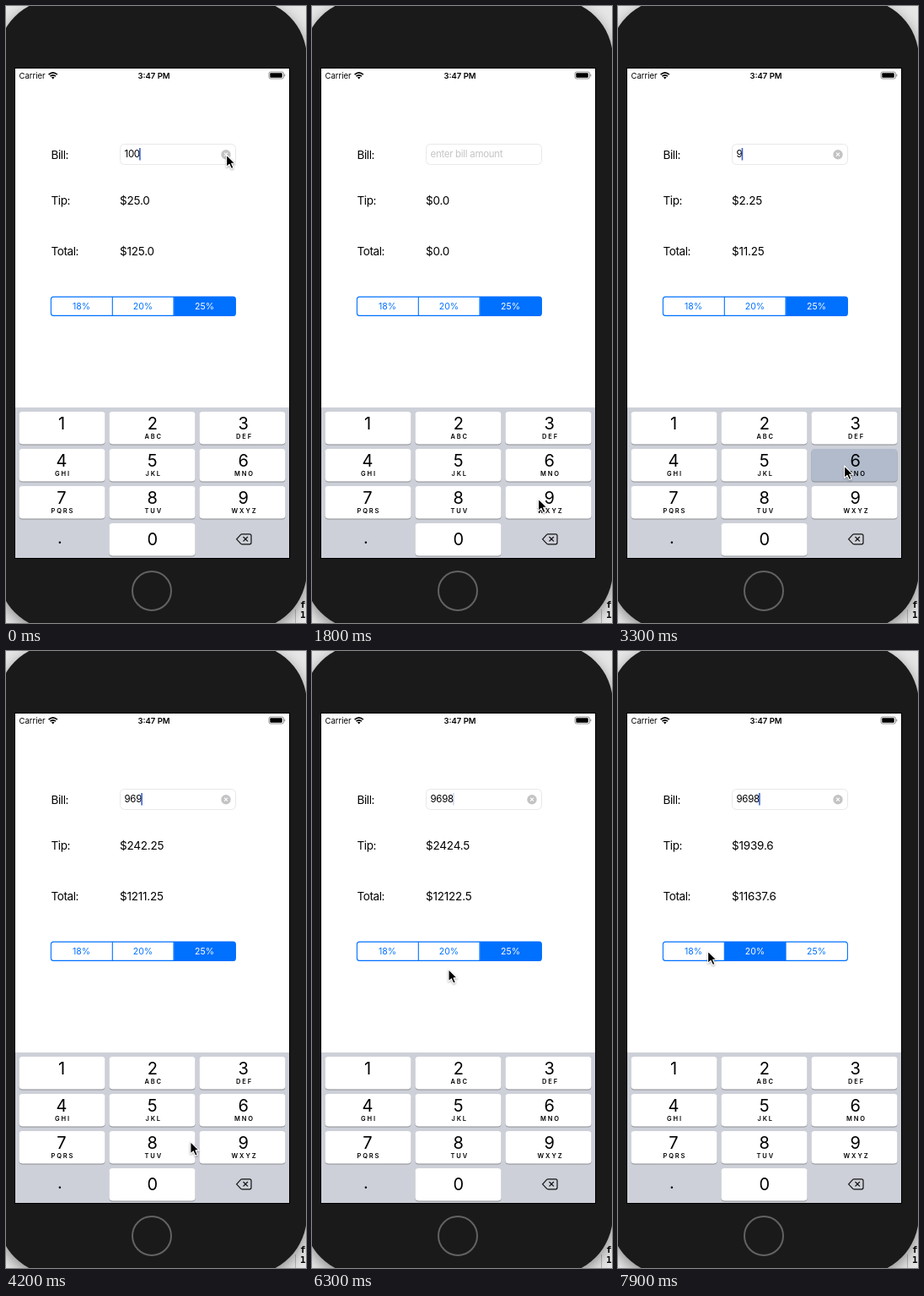
Recreate the animation shown at these times as an HTML page. Size 356 px wide and 730 px high, loop 8000 ms.

```html
<!DOCTYPE html>
<html lang="en">
<head>
<meta charset="utf-8">
<title>Tip calculator</title>
<style>
html, body { margin: 0; width: 100%; height: 100%; overflow: hidden; background: #e6e6e6; }
svg { display: block; width: 356px; height: 730px; font-family: Inter, sans-serif; }
.mid { text-anchor: middle; }
.label { font-size: 13.5px; letter-spacing: -.4px; }
.value { font-size: 13.5px; letter-spacing: -.2px; }
.field { font-size: 11.5px; letter-spacing: -.3px; }
.hint { font-size: 11.5px; letter-spacing: -.3px; fill: #c5c5c8; }
.status { font-size: 9.5px; }
.digit { font-size: 20px; }
.letters { font-size: 7.5px; font-weight: 600; letter-spacing: 1.9px; }
.percent { font-size: 10.5px; }
.mono { font: bold 11px "DejaVu Sans Mono", monospace; }
.phone { filter: drop-shadow(0 5px 8px #0006); }
.pointer { filter: drop-shadow(0 1px 1px #0005); }
</style>
</head>
<body>
<svg id="stage" viewBox="0 0 356 730"></svg>
<script>
const LOOP = 8000, STEP = 100, HOLD = 200, BLUE = '#0070ff';
const stage = document.getElementById('stage');
const rect = (x, y, w, h, fill, more = '') =>
  `<rect x="${x}" y="${y}" width="${w}" height="${h}" fill="${fill}" ${more}/>`;
const text = (x, y, cls, str, more = '') =>
  `<text x="${x}" y="${y}" class="${cls}" ${more}>${str}</text>`;

const letters = ['', 'ABC', 'DEF', 'GHI', 'JKL', 'MNO', 'PQRS', 'TUV', 'WXYZ'];
function key(digit) {
  const i = digit ? digit - 1 : 10, column = i % 3;
  const x = 15.5 + 107 * column, y = 480 + 44 * Math.floor(i / 3), middle = 66 + 107.8 * column;
  return rect(x, y + 1, 102, 38.5, '#8b8d92', 'rx="4"') +
    rect(x, y, 102, 38.5, '#fff', `rx="4" id="key${digit}"`) +
    text(middle, y + (digit ? 20.5 : 26), 'digit mid', digit) +
    (digit ? text(middle + 1.4, y + 32, 'letters mid', letters[i]) : '');
}

const rates = [18, 20, 25];
const segment = (rate, i) =>
  rect(53.3 + 73 * i, 344, 73, 23, '#fff', `id="seg${i}"`) +
  text(89.5 + 73 * i, 359, 'percent mid', rate + '%', `id="pct${i}"`);

stage.innerHTML =
  text(349, 712, 'mono', 'f') + text(349, 724, 'mono', '1') +
  rect(343, 714, 1, 16, '#b5b5b5') +
  rect(-10, -8, 367, 746, '#1a1a1a', 'rx="70" class="phone"') +
  '<circle cx="173" cy="692" r="23" fill="#1a1a1a" stroke="#626262" stroke-width="2"/>' +
  rect(10, 73, 327, 581, '#000') + rect(11, 74, 325, 579, '#fff') +
  // status bar
  text(15.5, 86, 'status', 'Carrier') +
  text(175.5, 86, 'status mid', '3:47 PM', 'font-weight="600"') +
  `<path d="M50.6 81.2Q55.7 76.6 60.8 81.2M52.5 83.2Q55.7 80.4 58.9 83.2"
    fill="none" stroke="#000" stroke-width="1.7"/>
  <path d="M53.9 84.5Q55.7 83 57.5 84.5L55.7 86.5Z"/>` +
  rect(312, 78, 17.5, 8, 'none', 'rx="2" stroke="#777" stroke-width=".8"') +
  rect(313.3, 79.3, 14.5, 5.4, '#000', 'rx="1"') +
  rect(330.3, 80.7, 1, 2.6, '#888') +
  // form
  text(53.5, 181, 'label', 'Bill:') + text(53.5, 235, 'label', 'Tip:') +
  text(53.5, 295, 'label', 'Total:') +
  text(135, 235, 'value', '', 'id="tip"') + text(135, 295, 'value', '', 'id="total"') +
  rect(135.5, 163.5, 137, 24, '#fff', 'rx="5" stroke="#e8e8e8"') +
  text(140.5, 179, 'hint', 'enter bill amount', 'id="hint"') +
  text(140.5, 179, 'field', '', 'id="bill"') +
  rect(0, 168, 1.6, 14.5, '#3b62d0', 'id="caret"') +
  `<g id="clear"><circle cx="261" cy="175.7" r="5.7" fill="#c3c3c6"/>
    <path d="M259 173.7l4 4m0-4l-4 4" stroke="#fff" stroke-width="1.1"/></g>` +
  '<clipPath id="round"><rect x="53" y="343.6" width="219.6" height="23.2" rx="3.5"/></clipPath>' +
  `<g clip-path="url(#round)">${rates.map(segment).join('')}</g>` +
  `<g stroke="${BLUE}" stroke-width="1.1">` +
  rect(53.4, 344.1, 219, 22.3, 'none', 'rx="3"') + '<path d="M126.3 344v22.5M199 344v22.5"/></g>' +
  // keypad
  rect(11, 475, 325, 178, '#cdd0d8') +
  [...'1234567890'].map(d => key(+d)).join('') +
  text(64, 636, 'digit mid', '.') +
  `<path d="M273.6 630.8l5-5.4q.6-.6 1.4-.6h9q2 0 2 2v8q0 2-2 2h-9q-.8 0-1.4-.6z
    M281.5 628l5.4 5.4m0-5.4l-5.4 5.4" fill="none" stroke="#111" stroke-width="1.2"/>` +
  `<path id="cursor" class="pointer" d="M.6 1V15.4L4 12.3L6.4 17.6L9 16.5L6.7 11.3H11Z"
    stroke="#fff" stroke-width="1.1" stroke-linejoin="round"/>`;

const el = id => document.getElementById(id);
const set = (id, name, value) => el(id).setAttribute(name, value);
const clamp = v => Math.max(0, Math.min(1, v));

const presses = [
  { at: 2600, digit: 9 }, { at: 3200, digit: 6 }, { at: 3900, digit: 9 }, { at: 4600, digit: 8 }
];
const home = { x: 261, y: 175 };
const moves = [
  { from: 400, to: 900, x: 268, y: 519 },
  { from: 1100, to: 1700, x: 268, y: 582 },
  { from: 2900, to: 3200, x: 268, y: 543 },
  { from: 3400, to: 3700, x: 268, y: 579 },
  { from: 4000, to: 4350, x: 181, y: 580 },
  { from: 4800, to: 5200, x: 249, y: 490 },
  { from: 5200, to: 5600, x: 161, y: 384 },
  { from: 6100, to: 6600, x: 162, y: 363 },
  { from: 7100, to: 7800, x: 106, y: 354 }
];

// Each move carries the pointer on from wherever the previous one left it.
function pointerAt(t) {
  let { x, y } = home;
  for (const m of moves) {
    const k = clamp((t - m.from) / (m.to - m.from));
    x += (m.x - x) * k;
    y += (m.y - y) * k;
  }
  return [x, y];
}

// The caret stays solid after input, then fades out and in once a second.
function caretAt(t) {
  const idle = t < 2800 ? t - 1500 : t - 5150;
  if (idle < 0) return 1;
  const s = idle % 1000;
  return clamp(s < 500 ? 1 - s / 200 : (s - 500) / 200);
}

function money(n) {
  const cents = Math.round(n * 100);
  return '$' + (cents / 100).toFixed(cents % 10 ? 2 : 1);
}

function draw(t) {
  const typed = presses.filter(p => t >= p.at + HOLD).map(p => p.digit).join('');
  const bill = t < 100 ? '100' : typed;
  const chosen = t < 6600 ? 2 : 1, tip = bill * rates[chosen] / 100;
  el('bill').textContent = bill;
  el('tip').textContent = money(tip);
  el('total').textContent = money(+bill + tip);
  set('hint', 'opacity', bill ? 0 : 1);
  set('clear', 'opacity', bill ? 1 : 0);
  set('caret', 'x', 139.8 + (bill ? el('bill').getComputedTextLength() : 0));
  set('caret', 'opacity', caretAt(t));
  rates.forEach((_, i) => {
    set('seg' + i, 'fill', i === chosen ? BLUE : '#fff');
    set('pct' + i, 'fill', i === chosen ? '#fff' : BLUE);
  });
  const held = presses.find(p => t >= p.at && t < p.at + HOLD);
  for (const { digit } of presses)
    set('key' + digit, 'fill', held?.digit === digit ? '#b1bbcc' : '#fff');
  set('cursor', 'transform', `translate(${pointerAt(t)})`);
}

const start = performance.now();
function tick() {
  const t = (performance.now() - start) % LOOP;
  draw(Math.floor(t / STEP) * STEP);
  requestAnimationFrame(tick);
}
tick();
</script>
</body>
</html>
```
